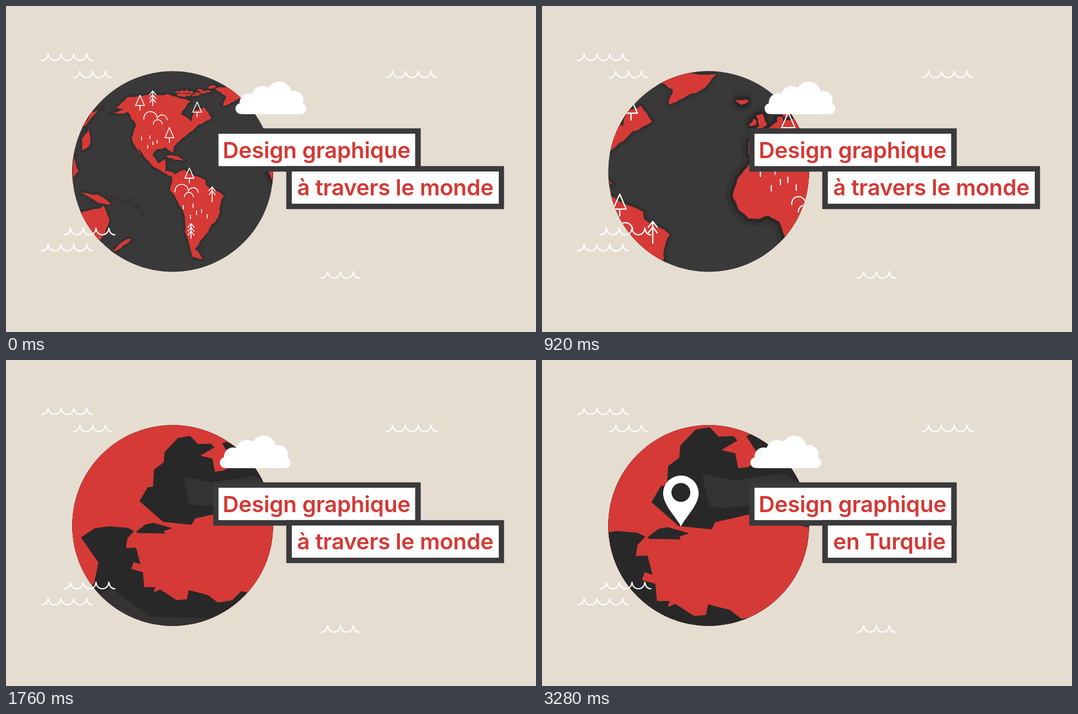
Recreate the animation shown at these times as an HTML page. Size 954x587 px, loop 4.88 s.

```html
<!DOCTYPE html>
<html lang="fr">
<head>
<meta charset="utf-8">
<title>Design graphique à travers le monde</title>
<style>
html, body { margin: 0; width: 100%; height: 100%; overflow: hidden; background: #e6ddd1; }
svg { display: block; width: 100%; height: 100%; }
.line { fill: none; stroke: #fff; stroke-linecap: round; stroke-linejoin: round; }
.label { fill: #3a393b; }
.paper { fill: #fff; }
text { font: 600 40px Inter, "Open Sans", sans-serif; letter-spacing: -.2px; fill: #d43834; }
</style>
</head>
<body>
<svg viewBox="0 0 954 587">
  <defs>
    <clipPath id="disc"><circle cx="300" cy="298" r="180.8"/></clipPath>
    <linearGradient id="outEdge" gradientUnits="userSpaceOnUse" x1="-9" x2="9" y1="0" y2="0">
      <stop stop-color="#fff"/><stop offset="1" stop-color="#000"/>
    </linearGradient>
    <linearGradient id="inEdge" gradientUnits="userSpaceOnUse" x1="-9" x2="9" y1="0" y2="0">
      <stop stop-color="#000"/><stop offset="1" stop-color="#fff"/>
    </linearGradient>
    <mask id="outMask" maskUnits="userSpaceOnUse" x="500" y="290" width="400" height="80">
      <rect x="500" y="290" width="400" height="80" fill="url(#outEdge)"/>
    </mask>
    <mask id="inMask" maskUnits="userSpaceOnUse" x="500" y="290" width="400" height="80">
      <rect x="500" y="290" width="400" height="80" fill="url(#inEdge)"/>
    </mask>
  </defs>
  <rect width="954" height="587" fill="#e6ddd1"/>
  <g clip-path="url(#disc)">
    <rect x="110" y="110" width="380" height="380" fill="#393939"/>
    <g id="far"></g>
    <g id="mid"></g>
    <g id="near"></g>
  </g>
  <g id="waves" class="line" stroke-width="2.2"></g>
  <path id="pin" fill="#fff" fill-rule="evenodd" d="M0 0C-7-16-32-38-32-60a32 32 0 0 1 64 0C32-38 7-16 0 0zM-17-61.500a17 17 0 0 0 34 0a17 17 0 0 0-34 0z"/>
  <g id="cloud" fill="#fff">
    <circle cx="437" cy="174" r="16.500"/><circle cx="462" cy="165" r="21"/>
    <circle cx="492" cy="158" r="22"/><circle cx="519" cy="169.500" r="16.500"/>
    <rect x="427" y="166" width="100" height="28.500"/>
    <rect x="413" y="175" width="127.500" height="19.500" rx="9.700"/>
  </g>
  <rect class="label" x="373" y="220.300" width="373.500" height="78"/>
  <rect class="paper" x="382.500" y="230" width="354" height="58.300"/>
  <rect id="frame" class="label" x="504.500" y="288.300" height="77.400"/>
  <rect id="inside" class="paper" x="514.500" y="298" height="58"/>
  <text x="390" y="274">Design graphique</text>
  <g mask="url(#outMask)"><text x="524" y="341">à travers le monde</text></g>
  <g mask="url(#inMask)"><text x="524" y="341">en Turquie</text></g>
</svg>
<script>
const LOOP = 4880, STEP = 40;
const RED = '#d63a36', DEEP = '#282828', SHELF = '#343331', OCEAN = '#393939';
const $ = id => document.getElementById(id);
const set = (el, attrs) => { for (const k in attrs) el.setAttribute(k, attrs[k]); };
function add(parent, d, attrs) {
  const el = document.createElementNS('http://www.w3.org/2000/svg', 'path');
  set(el, { d, ...attrs });
  parent.append(el);
}

let seed = 7;
const rand = (lo, hi) => {
  seed = (seed * 16807) % 2147483647;
  return lo + (hi - lo) * seed / 2147483647;
};

const poly = s => `M${s}z`;

// Fractal coastline: every side is split twice, each midpoint pushed sideways.
function coast(s) {
  let pts = s.split(' ').map(p => p.split(',').map(Number));
  for (let level = 0; level < 2; level++) {
    pts = pts.flatMap(([x, y], i) => {
      const [u, v] = pts[(i + 1) % pts.length];
      const push = rand(-.13, .13) * Math.min(1, 14 / Math.hypot(u - x, v - y));
      return [[x, y], [(x + u) / 2 + (v - y) * push, (y + v) / 2 - (u - x) * push]];
    });
  }
  return poly(pts.map(p => p.map(n => n.toFixed(1))).join(' '));
}

// A row of n islets running from (x, y) along (dx, dy).
const islets = (n, x, y, dx, dy, spread, size) => Array.from({ length: n }, (_, i) => {
  const k = i / (n - 1), w = rand(.5, 1) * size, h = w * rand(.3, .6);
  const left = x + dx * k - w, top = y + dy * k + rand(-spread, spread);
  return coast(`${left},${top} ${left + w},${top - h} ${left + 2 * w},${top} ${left + w},${top + h}`);
}).join('');

function land(g, d, outer, inner, tones) {
  const shore = { 'stroke-linejoin': 'bevel' };
  add(g, d, { ...shore, fill: tones[0], stroke: tones[0], 'stroke-width': outer });
  add(g, d, { ...shore, fill: tones[1], stroke: tones[1], 'stroke-width': inner });
  add(g, d, { fill: RED });
}

// Icons
const tree = (x, y, k = 1) =>
  `M${x} ${y}l${-8 * k} ${18.5 * k}h${16 * k}zm0 ${18.5 * k}v${8.5 * k}`;
const fir = (x, y, tiers) => `M${x} ${y}v27` +
  Array.from({ length: tiers }, (_, i) => `M${x - 5.5} ${y + 7 + i * 7}l5.500-7 5.500 7`).join('');
const bush = (x, y) =>
  `M${x} ${y + 11}a12 12 0 0 1 24-3M${x + 24} ${y + 10}a9.200 9.200 0 0 1 18 2M${x + 17} ${y + 20}a8 8 0 0 1 16 0`;
const rain = (x, y, k = 1, n = 6) => [[0, 2.6], [13, 20], [17.6, 0], [24, 12.5], [33, 9.7], [43, 19]]
  .slice(0, n).map(([dx, dy]) => `M${x + dx * k} ${y + dy * k}v${6.4 * k}`).join('');
const wave = (x, y, n) => `M${x} ${y}q10 0 12-12${'c1 16 22 16 23 0'.repeat(n)}q2 12 11 12`;

// Americas and the Pacific
const far = [
  '152,202 178,193 163,191 185,172 215,169 262,170 298,180 281,203 300,216 304,199 322,190 336,210 312,222 290,242 268,262 267,273 253,263 236,267 230,278 240,292 252,284 252,306 270,309 264,316 230,297 203,262 207,278 192,245 200,222 185,199',
  '266,312 287,303 325,322 326,331 358,350 350,375 348,388 333,407 314,433 306,447 320,463 302,460 288,415 285,378 261,340',
  '357,189 362,170 342,157 375,150 416,151 395,172 375,181',
  '254,279 272,278 291,289 275,285',
  '99,345 131,348 155,365 128,360',
  '95,380 134,373 141,367 152,392 144,419 133,431 96,399',
  '155,451 184,428 191,428 172,445',
  '104,226 118,200 144,188 126,203',
  '102,248 116,228 117,257 104,269',
  '88,275 97,306 86,318'
].map(coast).join('') +
  islets(22, 256, 170, 82, -10, 7, 7) + islets(13, 145, 350, 72, 30, 8, 1.5);
land($('far'), far, 11, 6, ['#363636', '#303030']);
add($('far'), [
  tree(207, 169), tree(310, 181), tree(260, 227), tree(296, 300),
  fir(230, 161, 3), fir(337, 334, 2), fir(299, 400, 3), bush(214, 201), bush(270, 332),
  rain(210, 242, .85, 5), rain(285, 365)
].join(''), { class: 'line', 'stroke-width': 1.6 });

// Europe and Africa
const mid = [
  '268,208 280,188 289,194 288,206',
  '288,178 305,175 318,205 300,217 288,217 297,207 293,193',
  '229,138 262,136 269,142 248,151',
  '383,118 336,155 340,175 357,172 362,183 372,186 388,160 430,100',
  '283,291 268,288 268,250 303,249 306,238 290,226 318,219 345,197 346,182 358,183 362,196 400,186 404,172 394,152 410,155 430,90 900,90 900,700 420,700 352,471 322,453 298,463 268,462 240,437 224,403 236,355 262,323'
].map(coast).join('');
land($('mid'), mid, 42, 18, [SHELF, DEEP]);
add($('mid'), coast('281,291 305,276 318,251 330,248 352,252 378,276 384,314 366,311 353,287 318,288') +
  poly('455,324 481,364 461,339'), { fill: DEEP });
add($('mid'), poly('309,276 326,256 356,266 368,279'), { fill: SHELF });
add($('mid'), [
  tree(375.5, 171, 2.27), tree(421, 142, 2.27), rain(299.5, 326, 2.27),
  'M385 423a18.500 18.500 0 0 1 37-6M421 421a26 26 0 0 1 52 0M403 443a19 19 0 0 1 38 0'
].join(''), { class: 'line', 'stroke-width': 3.2 });

// Black Sea, Marmara, Aegean and eastern Mediterranean
const near = $('near');
add(near, [
  '197,256 214,227 225,226 227,191 247,176 249,154 277,125 302,121 318,138 345,137 352,145 323,162 348,168 353,195 370,193 395,180 368,137 376,133 440,160 640,230 640,340 465,298 400,272 312,292 305,305 246,299',
  '190,319 210,304 226,301 265,312 247,318 250,323 193,322',
  '-101,229 -14,277 -14,322 37,391 71,450 103,427 112,383 76,331 105,312 135,308 172,311 186,318 172,333 169,353 190,352 199,387 185,382 180,396 204,403 207,434 230,434 226,445 240,439 274,461 295,459 299,440 338,450 359,466 389,461 408,442 440,450 406,634 204,599 66,570 8,645 -160,590 -160,440 -79,368 -118,300 -190,195'
].map(poly).join(''), { fill: DEEP });
add(near, poly('-187,405 -124,402 -130,440'), { fill: RED });
add(near, poly('288,205 345,217 437,204 510,255 322,266 300,262') +
  poly('-1,520 137,435 220,495 341,498 339,564 215,579 90,522 79,538'), { fill: SHELF });
add(near, poly('45,515 147,475 224,514 307,524 305,550 171,543 90,503'), { fill: OCEAN });

add($('waves'), [
  [64, 98, 3], [121, 129, 2], [684, 129, 3], [104, 412, 3], [64, 441, 3], [567, 490, 2]
].map(w => wave(...w)).join(''));

// Smooth monotone curve through [time, value] keys.
function track(keys) {
  const slope = i => (keys[i + 1][1] - keys[i][1]) / (keys[i + 1][0] - keys[i][0]);
  const tangents = keys.map((_, i) => {
    if (!i || i === keys.length - 1) return 0;
    const a = slope(i - 1), b = slope(i);
    return a * b > 0 ? 2 * a * b / (a + b) : 0;
  });
  return t => {
    if (t <= keys[0][0]) return keys[0][1];
    const i = keys.findIndex(k => k[0] >= t) - 1;
    if (i < 0) return keys[keys.length - 1][1];
    const [t0, a] = keys[i], [t1, b] = keys[i + 1], h = t1 - t0, u = (t - t0) / h;
    const e = u * u * (3 - 2 * u);
    return a + (b - a) * e + h * u * (1 - u) * ((1 - u) * tangents[i] - u * tangents[i + 1]);
  };
}
const travel = track([[0, 0], [640, .125], [1120, .461], [1440, .705], [1760, .89], [2320, 1]]);
const zoom = track([[640, .0789], [1120, .1736], [1440, .62], [1760, .87], [2320, 1]]);
const drift = track([[0, 0], [640, -7.5], [1440, -22.5], [2400, -36.7], [2800, -38]]);
const boxRight = track([[2440, 896.5], [2780, 746.5]]);
const wipeOut = track([[2340, 892], [2760, 508]]);
const wipeIn = track([[2720, 732], [3240, 510]]);

// Damped spring that pops up from nothing and settles at 1.
function pop(u) {
  if (u <= 0) return 0;
  if (u >= 1) return 1;
  return 1 - (1 - u) * Math.exp(-4 * u) * (Math.cos(9 * u) - 3 * Math.sin(9 * u));
}

function draw(t) {
  const p = travel(t), z = zoom(t);
  const x = 571.5 - 271.5 * p, y = 231.5 + 66.5 * p;
  const place = (id, k, ax, ay) =>
    set($(id), { transform: `translate(${x} ${y}) scale(${z * k}) translate(${-ax} ${-ay})` });
  place('far', 12.67, 537.5, 239.8);
  place('mid', 5.76, 446.5, 262.1);
  place('near', 1, 300, 298);
  set($('cloud'), { transform: `translate(${drift(t)})` });
  const right = boxRight(t);
  set($('frame'), { width: right - 504.5 });
  set($('inside'), { width: right - 524 });
  set($('outEdge'), { gradientTransform: `translate(${wipeOut(t)})` });
  set($('inEdge'), { gradientTransform: `translate(${wipeIn(t)})` });
  set($('pin'), { transform: `translate(250 300) scale(${pop((t - 2600) / 680)})` });
}

const start = performance.now();
function tick() {
  draw(Math.floor((performance.now() - start) % LOOP / STEP) * STEP);
  requestAnimationFrame(tick);
}
tick();
</script>
</body>
</html>
```
